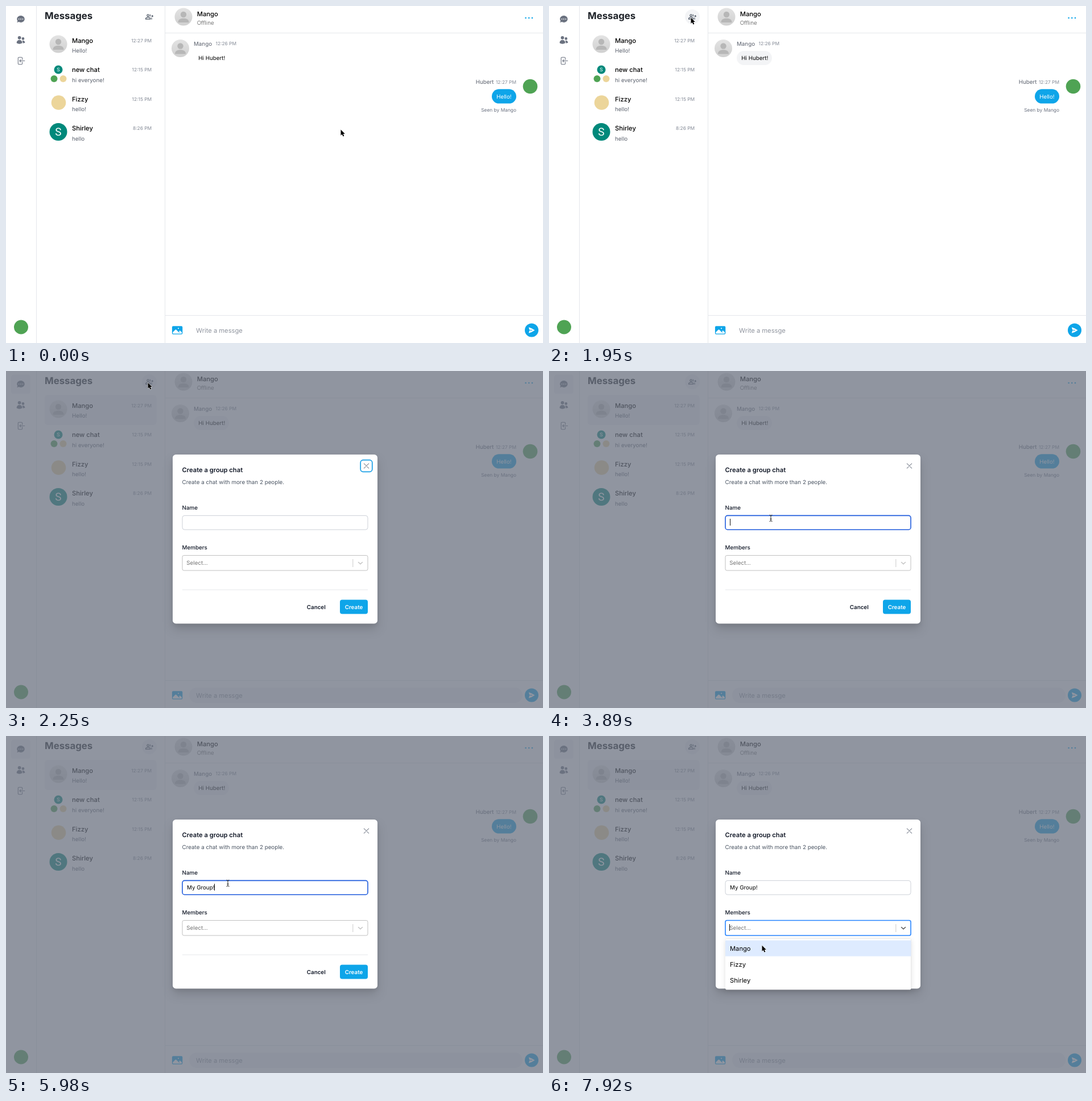
Animation of 944 by 593 pixels, one loop 8000 ms. Source, as an HTML page:

```html
<!DOCTYPE html>
<html lang="en">
<head>
<meta charset="utf-8">
<title>Create a group chat</title>
<style>
  html, body { margin: 0; width: 100%; height: 100%; overflow: hidden; background: #fff; }
  svg { display: block; font: 9.8px Inter, sans-serif; text-rendering: geometricPrecision; }
  text { white-space: pre; }
  .xs { font-size: 8.4px; fill: #858b97; }
  .md { font-size: 11.2px; }
  .medium { font-weight: 500; }
  .semi { font-weight: 600; }
  .gray { fill: #5b616d; }
  .end { text-anchor: end; }
  .mid { text-anchor: middle; }
  .line { stroke: #e5e7eb; fill: none; }
  .soft { fill: #f3f4f6; }
  .sky { fill: #0ea5e9; }
  .white { fill: #fff; }
  #panel { filter: drop-shadow(0 10px 9px rgba(0,0,0,.13)) drop-shadow(0 3px 3px rgba(0,0,0,.08)); }
  #menu rect:first-child { filter: drop-shadow(0 0 .6px rgba(0,0,0,.25)) drop-shadow(0 2px 4px rgba(0,0,0,.12)); }
</style>
</head>
<body>
<svg width="944" height="593" viewBox="0 0 944 593">
  <defs>
    <linearGradient id="shade" x2="0" y2="1">
      <stop offset="0" stop-color="#e3e3e3"/><stop offset="1" stop-color="#d0d0d0"/>
    </linearGradient>
    <g id="blank">
      <circle r="15.5" fill="url(#shade)"/>
      <g fill="#b7b7b7"><circle cy="-4" r="5.2"/><path d="M-9.5 10C-9.5 5 -6 2.700 0 2.700S9.500 5 9.500 10Z"/></g>
    </g>
  </defs>

  <path class="line" d="M53.5 0V593M279.5 0V593M279.5 47.5H944M279.5 544.5H944"/>
  <g id="tints" class="soft">
    <rect x="9" y="6.500" width="34" height="33.500" rx="4.500"/>
    <rect x="68" y="42" width="196.500" height="53" rx="5.500"/>
    <rect x="322" y="557" width="586" height="27" rx="13.500"/>
  </g>
  <g id="hover" class="soft">
    <circle cx="252" cy="19" r="13"/>
    <rect x="330" y="79" width="62" height="25" rx="12.500"/>
  </g>

  <g fill="#6b7280" fill-rule="evenodd">
    <path transform="translate(17.6 14.6) scale(.84)" d="M18 10c0 3.866-3.582 7-8 7a8.841 8.841 0 01-4.083-.98L2 17l1.338-3.123C2.493 12.767 2 11.434 2 10c0-3.866 3.582-7 8-7s8 3.134 8 7zM7 9H5v2h2V9zm8 0h-2v2h2V9zM9 9h2v2H9V9z"/>
    <path transform="translate(17.6 51.4) scale(.7)" d="M4.5 6.375a4.125 4.125 0 118.25 0 4.125 4.125 0 01-8.25 0zM14.25 8.625a3.375 3.375 0 116.75 0 3.375 3.375 0 01-6.75 0zM1.5 19.125a7.125 7.125 0 0114.25 0v.122a.75.75 0 01-.364.63 13.067 13.067 0 01-6.761 1.873c-2.472 0-4.786-.684-6.76-1.873a.75.75 0 01-.364-.63zM17.25 19.128a2.25 2.25 0 01-.234 1.104 10.088 10.088 0 005.06-1.01.75.75 0 00.42-.643 4.875 4.875 0 00-6.957-4.611 8.586 8.586 0 011.71 5.16z"/>
    <path transform="translate(17.6 88.1) scale(.7)" fill="none" stroke="#6b7280" stroke-width="1.5" stroke-linecap="round" d="M15.75 9V5.25A2.25 2.25 0 0013.5 3h-6a2.25 2.25 0 00-2.25 2.25v13.5A2.25 2.25 0 007.5 21h6a2.25 2.25 0 002.25-2.25V15M12 9l-3 3 3 3M9 12h12.75"/>
    <path transform="translate(245 12) scale(.583)" fill="#4b5563" d="M22 9V7h-2v2h-2v2h2v2h2v-2h2V9zM8 12c2.21 0 4-1.79 4-4s-1.79-4-4-4-4 1.79-4 4 1.79 4 4 4zm0-6c1.100 0 2 .9 2 2s-.9 2-2 2-2-.9-2-2 .9-2 2-2zM8 13c-2.670 0-8 1.340-8 4v3h16v-3c0-2.660-5.330-4-8-4zm6 5H2v-.99C2.200 16.290 5.300 15 8 15s5.800 1.290 6 2v1zM12.510 4.050C13.430 5.110 14 6.490 14 8s-.57 2.890-1.490 3.950C14.470 11.700 16 10.040 16 8s-1.530-3.700-3.490-3.950zM16.530 13.830C17.420 14.660 18 15.700 18 17v3h2v-3c0-1.450-1.590-2.510-3.470-3.170z"/>
  </g>
  <circle cx="26.500" cy="565" r="12.500" fill="#4fa354"/>

  <text x="68" y="23" font-size="16.8" font-weight="700" fill="#1f2329">Messages</text>
  <g id="rows"></g>
  <use href="#blank" x="92" y="67"/>
  <circle cx="92" cy="112" r="7.500" fill="#00897b"/>
  <text class="mid white" x="92" y="115.200" font-size="9" style="font-family:Roboto,sans-serif">S</text>
  <circle cx="84.500" cy="128" r="6" fill="#4fa354"/>
  <circle cx="100.500" cy="128" r="6" fill="#ecd59a"/>
  <circle cx="92.500" cy="170" r="12.800" fill="#ecd59a"/>
  <circle cx="92" cy="221.500" r="15.500" fill="#00897b"/>
  <text class="mid white" x="92" y="228.300" font-size="19" style="font-family:Roboto,sans-serif">S</text>

  <use href="#blank" x="312" y="19"/>
  <text class="md medium" x="335.700" y="18.200">Mango</text>
  <text x="335.700" y="33" font-weight="300" fill="#525252">Offline</text>
  <g class="sky"><circle cx="913.600" cy="21" r="1.300"/><circle cx="919.300" cy="21" r="1.300"/><circle cx="925" cy="21" r="1.300"/></g>

  <use href="#blank" x="306.500" y="74.500"/>
  <text class="gray" x="330" y="69.500">Mango</text>
  <text class="xs" x="368.500" y="69.200">12:26 PM</text>
  <text x="338.300" y="94.800">Hi Hubert!</text>
  <text class="gray end" x="857.500" y="137.200">Hubert</text>
  <text class="xs end" x="897" y="136.800">12:27 PM</text>
  <rect class="sky" x="854" y="146.200" width="43" height="25.400" rx="12.700"/>
  <text class="white mid" x="875.400" y="162.600">Hello!</text>
  <text class="xs end" x="897" y="186" style="fill:#6b7280">Seen by Mango</text>
  <circle cx="921.500" cy="141.500" r="12.800" fill="#4fa354"/>

  <path class="sky" fill-rule="evenodd" transform="translate(290.6 560) scale(.875)" d="M1.500 6a2.250 2.250 0 012.250-2.250h16.500A2.250 2.250 0 0122.500 6v12a2.250 2.250 0 01-2.250 2.250H3.750A2.250 2.250 0 011.500 18V6zM3 16.060V18c0 .414.336.75.75.75h16.500A.75.75 0 0021 18v-1.940l-2.690-2.689a1.500 1.500 0 00-2.120 0l-.88.879.97.97a.75.75 0 11-1.060 1.060l-5.160-5.159a1.500 1.500 0 00-2.120 0L3 16.060zm10.125-7.810a1.125 1.125 0 112.250 0 1.125 1.125 0 01-2.250 0z"/>
  <text class="md" x="334" y="575" fill="#8f949e">Write a messge</text>
  <circle class="sky" cx="924" cy="570.500" r="12"/>
  <path class="white" transform="translate(917.7 564.2) scale(.525)" d="M3.478 2.405a.75.75 0 00-.926.94l2.432 7.905H13.500a.75.75 0 010 1.500H4.984l-2.432 7.905a.75.75 0 00.926.94 60.519 60.519 0 0018.445-8.986.75.75 0 000-1.218A60.517 60.517 0 003.478 2.405z"/>

  <rect id="shadeAll" width="944" height="593" fill="#6b7280"/>

  <g id="modal">
    <rect id="panel" class="white" x="293" y="147" width="360" height="297.500" rx="5.600"/>
    <text class="md semi" x="309.600" y="178" fill="#111827">Create a group chat</text>
    <text x="309.600" y="198.500" fill="#4b5563">Create a chat with more than 2 people.</text>
    <path d="M629.300 162.800l8.400 8.400m0-8.400l-8.400 8.400" stroke="#858b97" stroke-width="1.100" stroke-linecap="round"/>
    <rect id="closeRing" x="623.200" y="156.700" width="20.600" height="20.600" rx="4.500" fill="none" stroke="#1a9fe6" stroke-width="1.700"/>
    <text class="medium" x="309.600" y="243.500" fill="#111827">Name</text>
    <rect id="nameBox" x="310" y="254.400" width="326" height="24.800" rx="4" fill="none"/>
    <text id="typed" x="318" y="270"></text>
    <text class="medium" x="309.600" y="313.800" fill="#111827">Members</text>
    <rect id="selectBox" x="310" y="324.500" width="326" height="26.500" rx="2.800" fill="none"/>
    <text x="317.300" y="341.200" fill="#757575">Select...</text>
    <path d="M609.800 331v14" stroke="#ccc"/>
    <path id="chevron" d="M619.500 336.500l3.500 3.300 3.500-3.300" fill="none" stroke-width="1.500" stroke-linecap="round"/>
    <path class="line" d="M310 385H636"/>
    <text class="semi" x="528.800" y="418.500" fill="#111827">Cancel</text>
    <rect class="sky" x="587" y="402.500" width="49" height="25" rx="4"/>
    <text class="semi white mid" x="611.500" y="418.500">Create</text>
    <g id="menu">
      <rect class="white" x="310" y="356.500" width="326.500" height="90" rx="2.800"/>
      <rect x="310" y="359.600" width="326.500" height="28" fill="#deebff"/>
      <g class="md"><text x="318" y="378">Mango</text><text x="318" y="406">Fizzy</text><text x="318" y="434">Shirley</text></g>
    </g>
    <path id="caret" d="M.5 0v12" stroke="#111"/>
  </g>

  <g id="pointer">
    <path id="arrow" d="M.5 .5V10.800L2.800 8.700 4.500 12.600 6.300 11.800 4.700 8H7.800Z" stroke="#fff" paint-order="stroke"/>
    <path id="beam" d="M-2.500 -5.500Q0 -5.500 0 -4Q0 -5.500 2.500 -5.500M0 -4V4M-2.500 5.500Q0 5.500 0 4Q0 5.500 2.500 5.500M-1.500 1.500H1.500" fill="none" stroke="#222"/>
  </g>
</svg>
<script>
const LOOP = 8000, STEP = 150, CLICK_NEW = 2100, CLICK_NAME = 2840, CLICK_SELECT = 6880;
const $ = id => document.getElementById(id);

$('rows').innerHTML = [
  ['Mango', 'Hello!', '12:27 PM'],
  ['new chat', 'hi everyone!', '12:15 PM'],
  ['Fizzy', 'hello!', '12:15 PM'],
  ['Shirley', 'hello', '8:26 PM'],
].map(([name, last, time], i) => `<g transform="translate(0 ${i * 51.5})">
  <text class="md medium" x="116" y="64.600">${name}</text>
  <text class="gray" x="116" y="82.400">${last}</text>
  <text class="xs end" x="256.200" y="63.500">${time}</text></g>`).join('');

// Pointer moves: start, number of steps, x, y
const moves = [
  [300, 5, 249, 24], [1350, 1, 245, 14], [1500, 1, 249, 20], [2390, 3, 390, 259],
  [6130, 3, 393, 358], [6580, 2, 397, 342], [7770, 2, 374, 368],
];
// Typing: time, characters shown
const keys = [[5090, 1], [5390, 2], [5540, 4], [5690, 6], [5840, 8], [5980, 9]];

const ease = p => p * p * (3 - 2 * p);
const show = (id, on) => $(id).style.display = on ? '' : 'none';
const stroke = (id, color, width) => {
  $(id).setAttribute('stroke', color);
  if (width) $(id).setAttribute('stroke-width', width);
};

function pointerAt(t) {
  let x = 588, y = 217;
  for (const [start, steps, toX, toY] of moves) {
    if (t < start) break;
    const p = ease(Math.min(1, (Math.floor((t - start) / STEP) + 1) / steps));
    x += (toX - x) * p;
    y += (toY - y) * p;
  }
  return [x, y];
}

function draw(t) {
  const nameFocus = t >= CLICK_NAME && t < CLICK_SELECT, selectFocus = t >= CLICK_SELECT;
  const opening = t < 2250;

  show('hover', t >= 1950);
  show('tints', t >= CLICK_NEW);
  show('shadeAll', t >= CLICK_NEW);
  show('modal', t >= CLICK_NEW);
  $('shadeAll').setAttribute('opacity', opening ? .61 : .75);
  $('modal').setAttribute('opacity', opening ? .84 : 1);
  $('modal').setAttribute('transform', opening ? 'translate(473 295.75) scale(.994) translate(-473 -295.75)' : '');

  show('closeRing', t < CLICK_NAME);
  stroke('nameBox', nameFocus ? '#1f5bdc' : '#cdd1d8', nameFocus ? 1.6 : 1);
  stroke('selectBox', selectFocus ? '#2684ff' : '#c0c0c0', selectFocus ? 1.6 : 1);
  stroke('chevron', selectFocus ? '#555' : '#c4c4c4');
  show('menu', selectFocus);

  const count = keys.reduce((n, [at, chars]) => t >= at ? chars : n, 0);
  $('typed').textContent = 'My Group!'.slice(0, count);

  const blink = (start, period) => (t - start) % period < period - 450;
  show('caret', selectFocus ? blink(CLICK_SELECT, 1040)
    : nameFocus && (count ? t < 6580 : blink(CLICK_NAME, 1050)));
  const caretX = selectFocus ? 317 : 318 + (count ? $('typed').getComputedTextLength() : 0);
  $('caret').setAttribute('transform', `translate(${Math.round(caretX)} ${selectFocus ? 331 : 260})`);

  const [x, y] = pointerAt(t);
  const overName = x > 310 && y > 254 && y < 280 && t > CLICK_NEW;
  show('beam', overName);
  show('arrow', !overName);
  $('pointer').setAttribute('transform', `translate(${x} ${y})`);
}

const begin = performance.now();
function tick() {
  draw((performance.now() - begin) % LOOP);
  requestAnimationFrame(tick);
}
tick();
</script>
</body>
</html>
```
